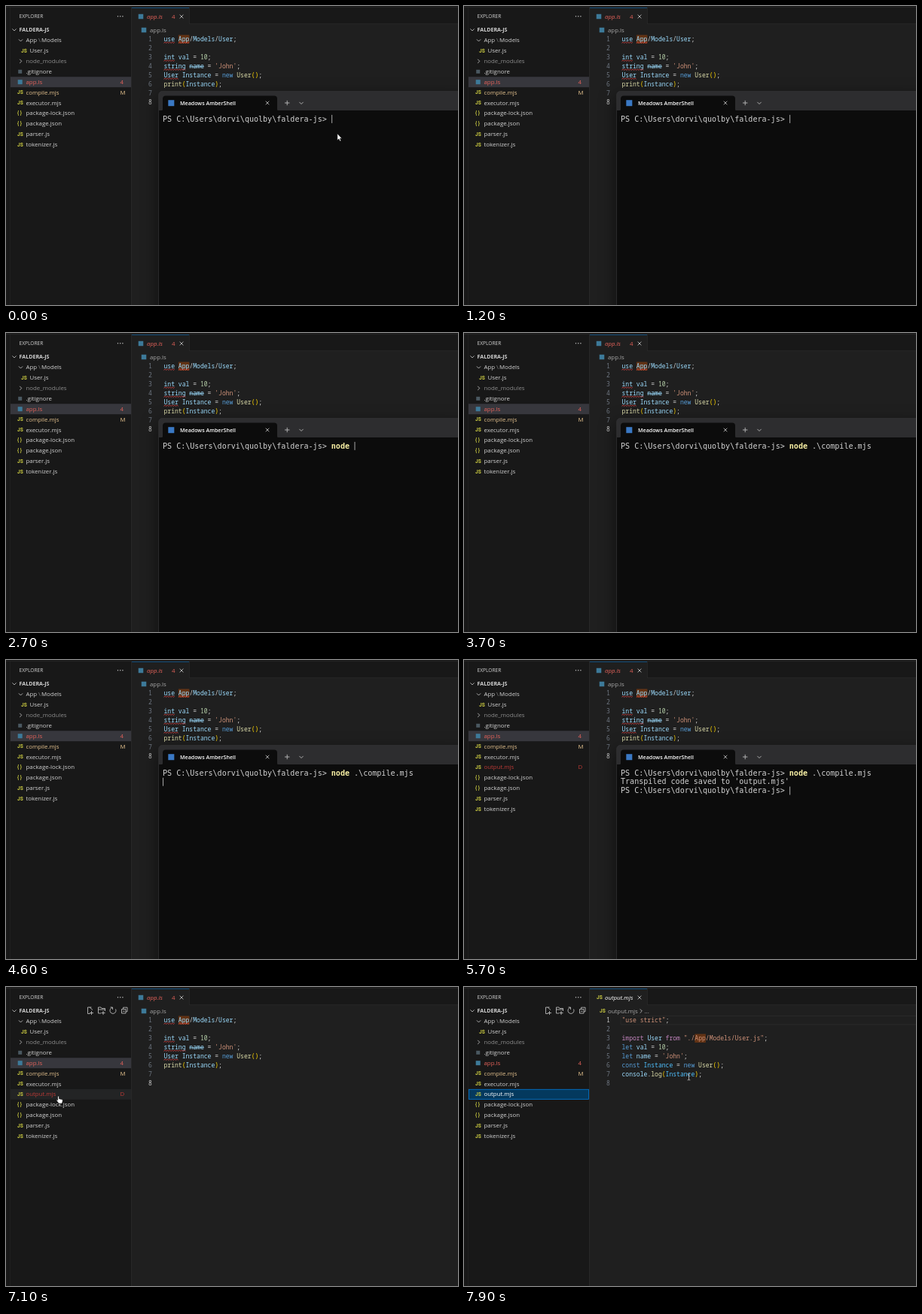
An HTML page that plays this animation: 600x398 px, repeating every 8000 ms.

```html
<!DOCTYPE html>
<html lang="en">
<head>
<meta charset="utf-8">
<title>Compile demo</title>
<style>
html, body { margin: 0; width: 100%; height: 100%; overflow: hidden; background: #181818; }
svg { display: block; width: 600px; height: 398px; }
text { fill: #d2d2d2; font: 7.85px "Open Sans", "Noto Sans", sans-serif; }
.small { font-size: 6.65px; }
.head { font-size: 7.1px; font-weight: 700; }
.title { font-size: 7.1px; font-weight: 600; fill: #fff; }
.tip { font-size: 7.1px; }
.tab { font-style: italic; }
.icon { font: 700 6.6px Roboto, "Liberation Sans", sans-serif; fill: #cbcb41; }
.code { font: 8.07px "Noto Sans Mono", "DejaVu Sans Mono", monospace; }
.num { text-anchor: end; }
.term { font: 10.06px "DejaVu Sans Mono", "Noto Sans Mono", monospace; }
.cmd { fill: #f9f1a5; font-weight: 700; }
.line { fill: none; stroke: #ccc; stroke-width: .8; }
.window { filter: drop-shadow(0 8px 11px rgba(0, 0, 0, .55)); }
</style>
</head>
<body>
<svg id="stage" viewBox="0 0 600 398"></svg>
<script>
const LOOP = 8000, STEP = 100;
const ROW = 13.87, ROW_TOP = 45.7;
const CODE_X = 209.5, CODE_W = 4.842, CODE_LINE = 12;
const TERM_X = 208, TERM_W = 6.057, TERM_Y = 153.6, TERM_LINE = 11.8;
const RED = '#e5625a', BLUE = '#9cdcfe', KEY = '#569cd6', FUNC = '#dcdcaa',
      STR = '#ce9178', NUM = '#b5cea8', BRACE = '#ffd700', PLAIN = '#d4d4d4',
      CONST = '#4fc1ff', FLOW = '#c586c0', DELETED = '#bd3a36';
const stage = document.getElementById('stage');

function add(parent, tag, attrs = {}, content = '') {
  const node = document.createElementNS('http://www.w3.org/2000/svg', tag);
  for (const key in attrs) node.setAttribute(key, attrs[key]);
  if (content) node.textContent = content.replace(/ /g, '\u00a0');
  return parent.appendChild(node);
}
const group = parent => add(parent, 'g');
const box = (p, x, y, width, height, fill, more) => add(p, 'rect', { x, y, width, height, fill, ...more });
const path = (p, d, more) => add(p, 'path', { d, class: 'line', ...more });
function label(p, x, y, content, cls = '', fill) {
  const node = add(p, 'text', { x, y, class: cls }, content);
  if (fill) node.style.fill = fill;
  return node;
}
const chevron = (p, x, y, turn = 0) =>
  path(p, 'M-2.6 -1.3L0 1.3L2.6 -1.3', { transform: `translate(${x} ${y}) rotate(${turn})` });
const cross = (p, x, y, r) => path(p, `M${x - r} ${y - r}l${2 * r} ${2 * r}m0 ${-2 * r}l${-2 * r} ${2 * r}`);
const squareIcon = (p, x, y, size, fill) => box(p, x - size / 2, y - size / 2, size, size, fill);
const show = (node, on) => { node.style.display = on ? '' : 'none'; };

// Window frame
box(stage, 0, 1, 600, 1, '#242424');
box(stage, 5, 2, 1, 396, '#1f1f1f');
box(stage, 166, 2, 1, 396, '#282828');
box(stage, 167, 24, 433, 374, '#1f1f1f');
box(stage, 243, 23.3, 357, .8, '#292929');
box(stage, 167, 2, 76, 23, '#1f1f1f');
box(stage, 167, 2, 76, .8, '#0a5590');
box(stage, 243, 2, .8, 22, '#292929');
cross(stage, 233, 14, 2.4);

// Explorer
label(stage, 17.5, 16.2, 'EXPLORER', 'small');
for (let i = 0; i < 3; i++) add(stage, 'circle', { cx: 148.5 + i * 3.2, cy: 13.7, r: .7, fill: '#ccc' });
chevron(stage, 11, 31.7);
label(stage, 17.5, 34.3, 'FALDERA-JS', 'head');

const tools = group(stage);
path(tools, 'M113.5 27h-5v8.5h3M111 27l4 3.5M113.5 32v5M111 34.5h5');
path(tools, 'M126 35h-3.5v-8h3.5l1 1.5h4.5v3.5M122.5 30h9M129 32v5M126.5 34.5h5');
path(tools, 'M145.5 29.5a4 4 0 1 1 -4.5 -2M138.5 27h3v3');
path(tools, 'M153.5 29.5h5.5v5.5h-5.5zM155.5 29v-1.8h5.5v5.5h-1.8M155 32.2h2.6');

const rowY = i => ROW_TOP + ROW * i;
const picked = box(stage, 6, rowY(4) - 6.9, 160, ROW, '#37373d');
const hover = box(stage, 6, rowY(7) - 6.9, 160, ROW, '#232425');
const focus = box(stage, 6.4, rowY(7) - 6.5, 159.2, ROW - .8, '#04395e', { stroke: '#0078d4', 'stroke-width': .8 });

function file(p, i, name, icon, { color, mark, indent = 0 } = {}) {
  const y = rowY(i);
  if (icon) label(p, 15 + indent, y + 2.3, icon, 'icon');
  const text = label(p, 26.5 + indent, y + 2.7, name, '', color);
  const flag = mark && label(p, 151.5, y + 2.7, mark, '', color);
  return { text, flag };
}

chevron(stage, 19.5, rowY(0));
file(stage, 0, 'App');
label(stage, 43, rowY(0) + 2.7, '\\', '', '#858585');
label(stage, 47, rowY(0) + 2.7, 'Models');
file(stage, 1, 'User.js', 'JS', { indent: 5 });
chevron(stage, 19.5, rowY(2), -90);
file(stage, 2, 'node_modules', '', { color: '#8c8c8c' });
squareIcon(stage, 18.7, rowY(3), 5, '#4a5860');
file(stage, 3, '.gitignore');
squareIcon(stage, 18.7, rowY(4), 6, '#3d7a99');
file(stage, 4, 'app.ls', '', { color: RED, mark: '4' });
file(stage, 5, 'compile.mjs', 'JS', { color: '#e2c08d', mark: 'M' });
file(stage, 6, 'executor.mjs', 'JS');
const outRow = group(stage);
const out = file(outRow, 7, 'output.mjs', 'JS', { color: DELETED, mark: 'D' });
const lower = group(stage);
[['package-lock.json', '{ }'], ['package.json', '{ }'], ['parser.js', 'JS'], ['tokenizer.js', 'JS']]
  .forEach(([name, icon], i) => file(lower, 7 + i, name, icon));

// Editors
const codeY = i => 47 + CODE_LINE * i;
const col = n => CODE_X + CODE_W * n;

function editor(lines, active, match) {
  const g = group(stage);
  box(g, col(match[1]), codeY(match[0]) - 8.5, CODE_W * 3, 11.5, '#623315');
  lines.forEach((tokens, i) => {
    label(g, 193.8, codeY(i), String(i + 1), 'code num', i === active ? '#ccc' : '#6e7681');
    const text = label(g, CODE_X, codeY(i), '', 'code');
    for (let k = 0; k < tokens.length; k += 2) {
      add(text, 'tspan', {}, tokens[k + 1]).style.fill = tokens[k];
    }
  });
  return g;
}
function squiggle(p, line, from, to) {
  let d = `M${col(from)} ${codeY(line) + 2.4}`;
  const n = Math.round((to - from) * CODE_W / 1.6);
  for (let i = 0; i < n; i++) d += `l1.6 ${i % 2 ? 1.3 : -1.3}`;
  path(p, d, { style: 'stroke:#f14c4c;stroke-width:.7' });
}

const appEditor = editor([
  [BLUE, 'use App', PLAIN, '/', BLUE, 'Models', PLAIN, '/', BLUE, 'User', PLAIN, ';'],
  [],
  [BLUE, 'int val', PLAIN, ' = ', NUM, '10', PLAIN, ';'],
  [BLUE, 'string name', PLAIN, ' = ', STR, "'John'", PLAIN, ';'],
  [BLUE, 'User Instance', PLAIN, ' = ', KEY, 'new ', FUNC, 'User', BRACE, '()', PLAIN, ';'],
  [FUNC, 'print', BRACE, '(', BLUE, 'Instance', BRACE, ')', PLAIN, ';'],
  [], []
], 7, [0, 4]);
squiggle(appEditor, 0, 0, 3);
squiggle(appEditor, 0, 4, 7);
squiggle(appEditor, 2, 0, 3);
squiggle(appEditor, 3, 0, 6);
squiggle(appEditor, 4, 0, 4);
box(appEditor, col(7), codeY(3) - 2.6, CODE_W * 4, .8, BLUE);
squareIcon(appEditor, 179, 14, 6.5, '#3d7a99');
label(appEditor, 187, 16.7, 'app.ls', 'tab', RED);
label(appEditor, 220, 16.5, '4', '', RED);
squareIcon(appEditor, 183, 32, 6.5, '#3d7a99');
label(appEditor, 191, 34.8, 'app.ls', '', '#a9a9a9');

const outEditor = editor([
  [STR, '"use strict"', PLAIN, ';'],
  [],
  [FLOW, 'import ', BLUE, 'User ', FLOW, 'from ', STR, '"./App/Models/User.js"', PLAIN, ';'],
  [KEY, 'let ', BLUE, 'val', PLAIN, ' = ', NUM, '10', PLAIN, ';'],
  [KEY, 'let ', BLUE, 'name', PLAIN, ' = ', STR, "'John'", PLAIN, ';'],
  [KEY, 'const ', CONST, 'Instance', PLAIN, ' = ', KEY, 'new ', FUNC, 'User', BRACE, '()', PLAIN, ';'],
  [BLUE, 'console', PLAIN, '.', FUNC, 'log', BRACE, '(', CONST, 'Instance', BRACE, ')', PLAIN, ';'],
  []
], 0, [2, 20]);
path(outEditor, 'M600 38.5H208V50H600', { style: 'stroke:#2c2c2c' });
label(outEditor, 176, 16.3, 'JS', 'icon');
label(outEditor, 187, 16.7, 'output.mjs', 'tab', '#fff');
label(outEditor, 180, 34.4, 'JS', 'icon');
label(outEditor, 191, 34.8, 'output.mjs', '', '#a9a9a9');
chevron(outEditor, 235, 32, -90);
label(outEditor, 239.5, 34.8, '...', '', '#a9a9a9');

// Tooltip
const tip = group(stage);
box(tip, 75.5, 150, 150, 14.5, '#1f1f1f', { stroke: '#3c3c3c', 'stroke-width': .8, rx: 1.5 });
label(tip, 80, 159.9, 'C:\\Users\\dorvi\\quolby\\faldera-js\\output.mjs', 'tip');

// Terminal
const term = group(stage);
box(term, 202.7, 113.4, 410, 300, '#2d2d2f', { rx: 5, stroke: '#363637', 'stroke-width': .7, class: 'window' });
box(term, 203, 139, 397, 259, '#0c0c0c');
path(term, 'M206 139.5q2 0 2 -2v-14q0 -4 4 -4h144q4 0 4 4v14q0 2 2 2z', { style: 'fill:#0c0c0c;stroke:none' });
squareIcon(term, 219.3, 129.2, 8, '#3a78c4');
label(term, 231, 131.9, 'Meadows AmberShell', 'title');
cross(term, 347, 129, 2.3);
path(term, 'M370 129h6.4M373.2 125.8v6.4');
chevron(term, 392, 129.2);

const PROMPT = 'PS C:\\Users\\dorvi\\quolby\\faldera-js> ';
const lineY = i => TERM_Y + TERM_LINE * i;
const first = label(term, TERM_X, lineY(0), PROMPT, 'term');
const command = add(first, 'tspan', { class: 'cmd' });
const args = add(first, 'tspan');
const result = group(term);
label(result, TERM_X, lineY(1), "Transpiled code saved to 'output.mjs'", 'term');
label(result, TERM_X, lineY(2), PROMPT, 'term');
const caret = box(term, 0, 0, .8, 11, '#ccc');

// Pointers
const pointer = group(stage);
const ink = { style: 'fill:#fff;stroke:#000;stroke-width:.6' };
const shapes = {
  arrow: path(pointer, 'M0 0V9L2 7.2L3.5 10.3L5 9.6L3.6 6.6H6.2Z', ink),
  hand: path(pointer, 'M-.8 .8q.9 -1.3 1.8 0v3l3.8 .8q1.2 .4 1 1.8l-.8 3.6h-4.6l-3 -4.2q.2 -1.3 1.8 -.2z', ink),
  beam: path(pointer, 'M-1.8 -4h1.4l.4 .5l.4 -.5h1.4M0 -3.5v7M-1.8 4h1.4l.4 -.5l.4 .5h1.4')
};

// Timeline
const ENTER = 4300, OUTPUT = 4700, LISTED = 4900, RAISED = 7100, OPENED = 7200;
const typed = [[0, ''], [1500, 'n'], [1700, 'no'], [2000, 'nod'], [2200, 'node'], [2500, 'node '],
  [2900, 'node c'], [3000, 'node co'], [3200, 'node .\\compile.mjs']];
const moves = [
  [[0, 439.8, 169.8], [600, 439.8, 169.8]],
  [[5900, 487, 176], [6100, 310, 174], [6300, 110, 155], [6500, 69.5, 145], [7200, 69.5, 145],
   [7400, 200, 138], [7600, 384, 128], [7900, 298.5, 119.8], [8000, 298.5, 119.8]]
];

function mouseAt(t) {
  const run = moves.find(m => t >= m[0][0] && t < m[m.length - 1][0]);
  if (!run) return null;
  const i = run.findIndex((k, n) => n && t < k[0]);
  const [a, b] = [run[i - 1], run[i]];
  const u = (t - a[0]) / (b[0] - a[0]);
  return [a[1] + (b[1] - a[1]) * u, a[2] + (b[2] - a[2]) * u];
}

function drawTerminal(t) {
  const [since, text] = typed.filter(k => k[0] <= t).pop();
  const shown = text.replace(/ /g, '\u00a0');
  command.textContent = shown.slice(0, 4);
  args.textContent = shown.slice(4);
  const done = t >= OUTPUT;
  show(result, done);
  const [row, chars, start] = done ? [2, PROMPT.length, OUTPUT]
    : t >= ENTER ? [1, 0, ENTER]
    : [0, PROMPT.length + text.length, since];
  caret.setAttribute('x', TERM_X + TERM_W * chars + .2);
  caret.setAttribute('y', lineY(row) - 8.7);
  show(caret, (t - start) % 1000 < 500);
  show(term, t < RAISED);
}

function draw(t) {
  const opened = t >= OPENED;
  const mouse = mouseAt(t);
  drawTerminal(t);
  show(appEditor, !opened);
  show(outEditor, opened);
  show(picked, !opened);
  show(focus, opened);
  show(hover, !opened && t >= 6400);
  show(tools, t >= 6300);
  show(tip, t >= 6900 && t < RAISED);
  show(outRow, t >= LISTED);
  lower.setAttribute('transform', `translate(0 ${t >= LISTED ? ROW : 0})`);
  out.text.style.fill = opened ? '#fff' : DELETED;
  show(out.flag, !opened);
  show(pointer, mouse);
  if (mouse) {
    const kind = mouse[0] < 166 ? 'hand' : opened ? 'beam' : 'arrow';
    for (const name in shapes) show(shapes[name], name === kind);
    pointer.setAttribute('transform', `translate(${mouse})`);
  }
}

const began = performance.now();
function tick() {
  const t = (performance.now() - began) % LOOP;
  draw(Math.floor(t / STEP) * STEP);
  requestAnimationFrame(tick);
}
tick();
</script>
</body>
</html>
```
